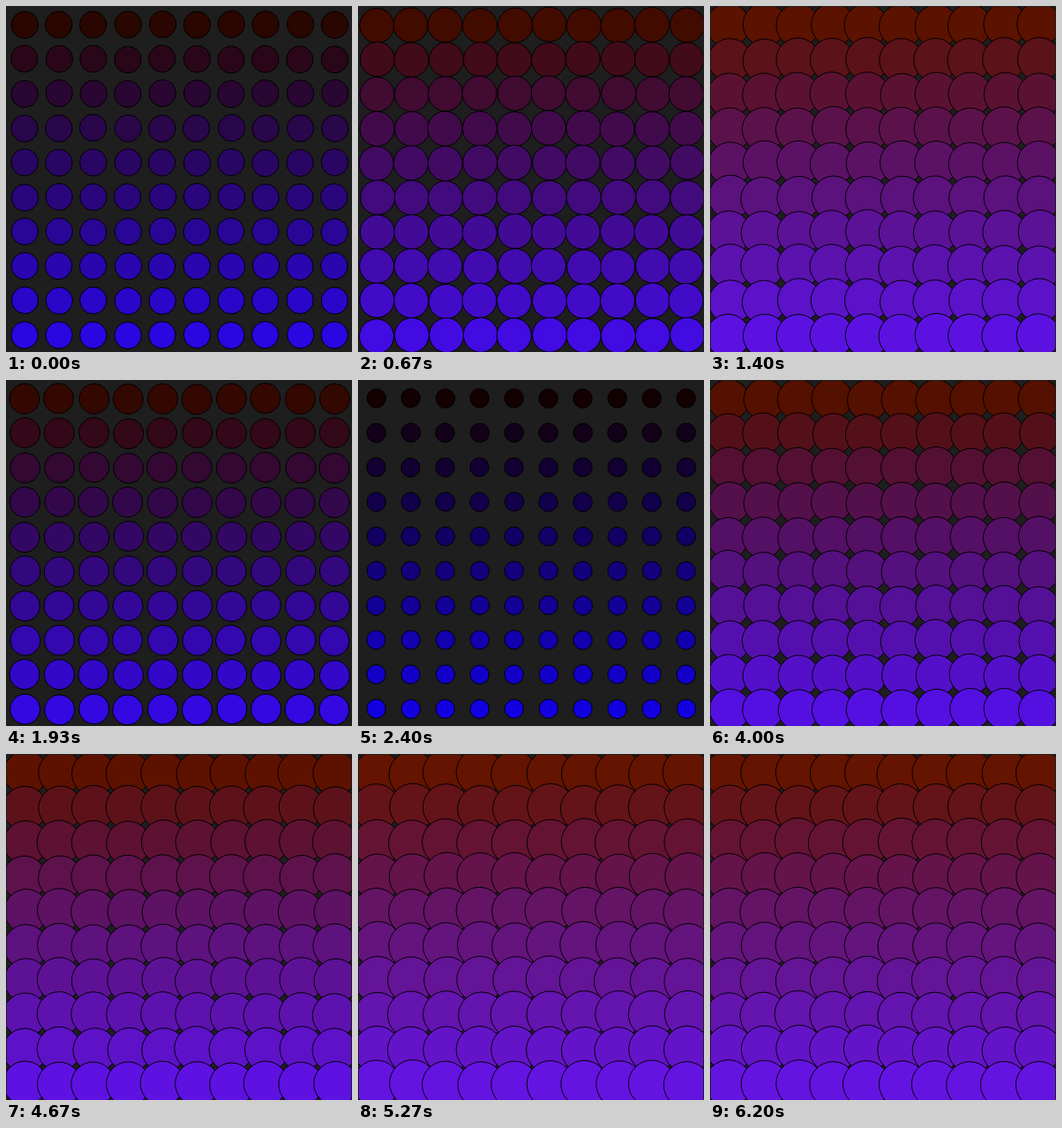
Recreate the animation shown at these times as an HTML page with a canvas. Size 402 by 401 pixels, loop 6270 ms.

```html
<!DOCTYPE html>
<html lang="en">
<head>
<meta charset="utf-8">
<title>Pulsing dots</title>
<style>
  html, body { margin: 0; width: 100%; height: 100%; overflow: hidden; background: #1e1e1e; }
  canvas { display: block; }
</style>
</head>
<body>
<canvas width="402" height="401"></canvas>
<script>
const ctx = document.querySelector('canvas').getContext('2d');
const LOOP = 6270, STEPS = 94;

// [step, radius]
const keys = [[0, 15.6], [21, 25.2], [36, 11], [49, 20.9], [60, 23.7], [79, 27], [93, 27]];

function radiusAt(step) {
  const i = Math.max(1, keys.findIndex(k => k[0] >= step));
  const [s0, r0] = keys[i - 1], [s1, r1] = keys[i];
  const u = (step - s0) / (s1 - s0);
  return r0 + (r1 - r0) * u * u * (3 - 2 * u);
}

function seededRandom(seed) {
  return () => {
    seed = (seed + 0x6D2B79F5) | 0;
    let t = Math.imul(seed ^ (seed >>> 15), 1 | seed);
    t = (t + Math.imul(t ^ (t >>> 7), 61 | t)) ^ t;
    return ((t ^ (t >>> 14)) >>> 0) / 4294967296;
  };
}

// The static one-pixel margin at the left and top stays uncovered.
ctx.fillStyle = '#1e1e1e';
ctx.fillRect(0, 0, 402, 401);
ctx.beginPath();
ctx.rect(1, 1, 400, 400);
ctx.clip();
ctx.strokeStyle = '#000';

function draw(step) {
  const r = radiusAt(step);
  const red = 5.1 * (r - 7.3);
  const green = Math.max(0, (red - 18) * 0.24);
  const random = seededRandom(step * 977 + 5);
  const place = n => 21 + 40 * n + random() * red * 0.029;

  ctx.fillStyle = '#1e1e1e';
  ctx.fillRect(0, 0, 402, 401);
  for (let row = 0; row < 10; row++) {
    ctx.fillStyle = `rgb(${Math.round(red)}, ${Math.round(green)}, ${row * 25})`;
    for (let col = 0; col < 10; col++) {
      ctx.beginPath();
      ctx.arc(place(col), place(row), r, 0, 2 * Math.PI);
      ctx.fill();
      ctx.stroke();
    }
  }
}

const start = performance.now();
let shown = -1;

function tick() {
  const time = (performance.now() - start) % LOOP;
  const step = Math.min(STEPS - 1, Math.floor((time + 4) * STEPS / LOOP));
  if (step !== shown) draw(shown = step);
  requestAnimationFrame(tick);
}
tick();
</script>
</body>
</html>
```
